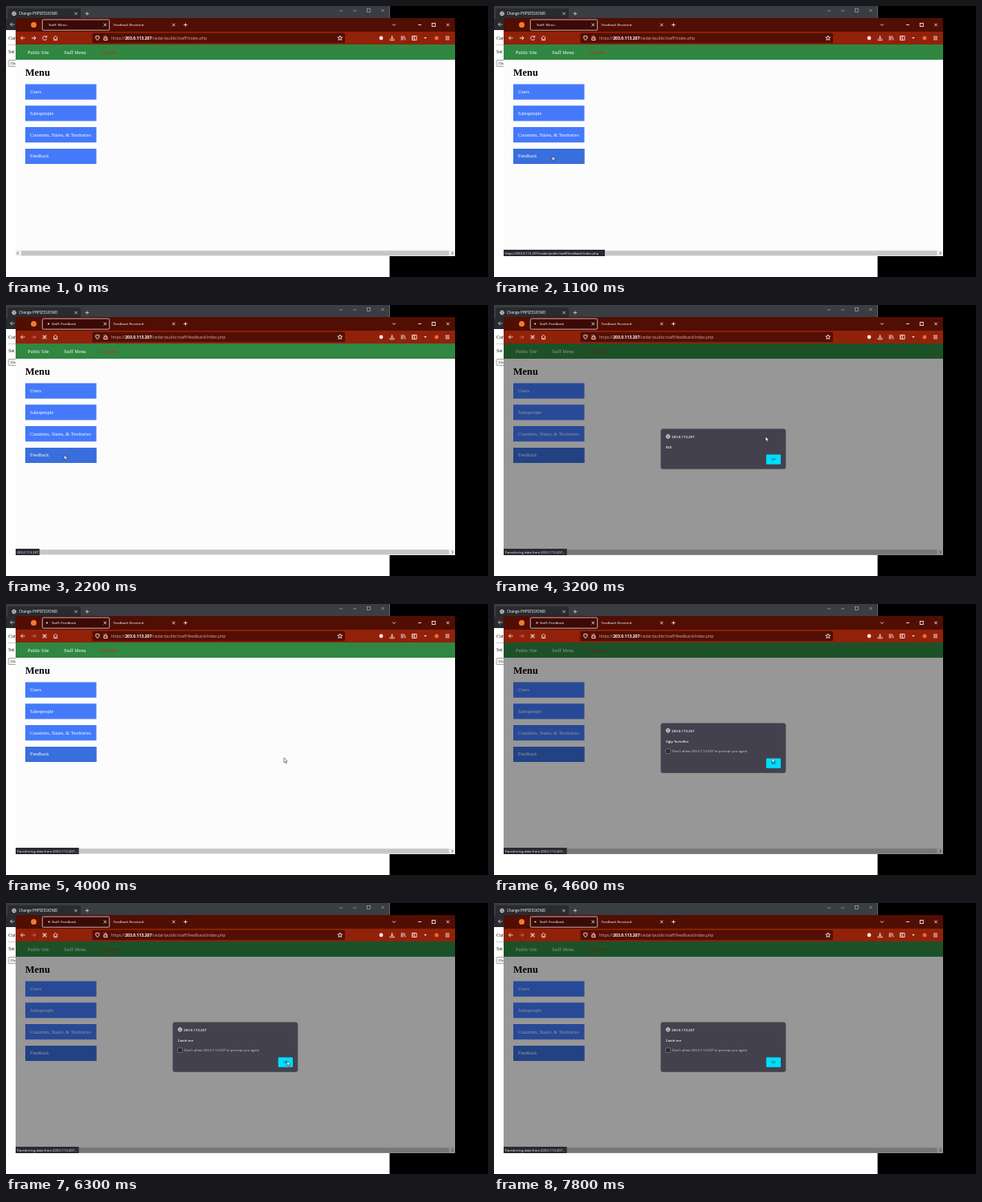
Recreate the animation shown at these times as an HTML page. Size 600 px wide and 338 px high, loop 7.9 s.

```html
<!DOCTYPE html>
<html lang="en">
<head>
<meta charset="utf-8">
<title>Staff feedback</title>
<style>
html, body { margin: 0; width: 100%; height: 100%; overflow: hidden; background: #000; }
svg { display: block; width: 600px; height: 338px; }
text { font: 4.3px "Open Sans", "Noto Sans", sans-serif; fill: #fbfbfe; white-space: pre; }
.serif text { font: 6.1px "Liberation Serif", serif; }
.serif .h1 { font-weight: 700; font-size: 12.3px; fill: #000; }
.url text { font-size: 5.05px; fill: #d9aaa3; }
.url tspan { font-weight: 700; fill: #fff; }
.status rect { fill: #2b2a33; }
.status text { font-size: 4.15px; }
.line { fill: none; stroke: #f6e6e3; stroke-width: .9; }
.thin { stroke-width: .7; }
.gray { stroke: #a5a8ac; }
.bold { font-weight: 600; }
.ok { font-size: 4.1px; fill: #15303a; }

.before, .after, .link, .host, .transfer, .hover, .dim, .xss, .ugly, .catch, .ok1, .ok2, .pointer {
  animation: 7.9s step-end infinite;
}
.before { animation-name: before; }
.after { animation-name: after; }
.link { animation-name: link; }
.host { animation-name: host; }
.transfer { animation-name: transfer; }
.hover { animation-name: hover; }
.dim { animation-name: dim; }
.xss { animation-name: xss; }
.ugly { animation-name: ugly; }
.catch { animation-name: catch; }
.ok1 { animation-name: ok1; }
.ok2 { animation-name: ok2; }
.pointer { animation-name: pointer; }
.move { animation: move 7.9s linear infinite; }
.dot { animation: dot .2079s -.158s ease-in-out infinite alternate; }

@keyframes before { 0% { opacity: 1 } 24.05%, 100% { opacity: 0 } }
@keyframes after { 0% { opacity: 0 } 24.05%, 100% { opacity: 1 } }
@keyframes link { 0%, 24.05%, 100% { opacity: 0 } 11.39% { opacity: 1 } }
@keyframes host { 0%, 29.11%, 100% { opacity: 0 } 24.05% { opacity: 1 } }
@keyframes transfer { 0% { opacity: 0 } 29.11%, 100% { opacity: 1 } }
@keyframes hover { 0% { opacity: 0 } 8.86%, 100% { opacity: 1 } }
@keyframes dim { 0%, 48.73%, 77.85% { opacity: 0 } 30.38%, 52.53%, 79.11%, 100% { opacity: 1 } }
@keyframes xss { 0%, 48.73%, 100% { opacity: 0 } 30.38% { opacity: 1 } }
@keyframes ugly { 0%, 77.85%, 100% { opacity: 0 } 52.53% { opacity: 1 } }
@keyframes catch { 0% { opacity: 0 } 79.11%, 100% { opacity: 1 } }
@keyframes ok1 { 0% { opacity: 0 } 43.04%, 100% { opacity: 1 } }
@keyframes ok2 { 0%, 88.61%, 100% { opacity: 0 } 65.82% { opacity: 1 } }
@keyframes pointer { 0%, 88.61%, 100% { opacity: 0 } 2.53% { opacity: 1 } }
@keyframes move {
  0% { transform: translate(190px, 150px) }
  2.53% { transform: translate(190px, 150px); animation-timing-function: steps(6) }
  10.13% { transform: translate(72.5px, 187px) }
  30.38% { transform: translate(72.5px, 187px); animation-timing-function: steps(8) }
  40.51% { transform: translate(338px, 164px); animation-timing-function: steps(3) }
  44.3% { transform: translate(346px, 191.7px) }
  64.56% { transform: translate(346px, 191.7px); animation-timing-function: steps(8) }
  74.68% { transform: translate(348px, 196px) }
  77.22% { transform: translate(348px, 196px); animation-timing-function: steps(2) }
  79.75% { transform: translate(350px, 197px) }
  83.54% { transform: translate(350px, 197px); animation-timing-function: steps(4) }
  88.61%, 100% { transform: translate(372px, 180px) }
}
@keyframes dot { from { transform: translateX(0) } to { transform: translateX(2.6px) } }
</style>
</head>
<body>
<svg viewBox="0 0 600 338">
  <defs>
    <path id="x" d="M-1.7-1.7 1.7 1.7M1.7-1.7-1.7 1.7"/>
    <path id="plus" d="M-2.2 0H2.2M0-2.2V2.2"/>
    <path id="arrow" d="M2.6 0H-2.6M-.2-2.4-2.6 0-.2 2.4"/>
    <path id="down" d="M-2-1 0 1 2-1"/>
    <path id="min" d="M-2 0H2"/>
    <rect id="max" x="-2" y="-2" width="4" height="4"/>
    <g id="globe" fill="none">
      <circle r="2.4"/><ellipse rx="1.1" ry="2.4"/><path d="M-2.4 0H2.4"/>
    </g>
  </defs>

  <!-- rear window -->
  <path fill="#fff" d="M0 0H477.5V338H0z"/>
  <path fill="#3a3e42" d="M0 0H477.5V16H0z"/>
  <path fill="#282b2f" d="M2 16V5q0-2 2-2H91q2 0 2 2V16zM0 16H477.5V30H0z"/>
  <text x="16" y="11.2" style="font-size:4.5px">Change PHPSESSIONID</text>
  <g class="line thin">
    <use href="#globe" x="10" y="9.5"/>
    <use href="#x" x="87" y="9.5"/>
    <use href="#plus" x="101" y="9.5"/>
    <use href="#arrow" x="8" y="23"/>
    <g class="gray">
      <use href="#down" x="417" y="6"/>
      <use href="#min" x="434" y="6"/>
      <use href="#max" x="451.5" y="5.5"/>
      <use href="#x" x="469" y="5.5"/>
    </g>
  </g>
  <g class="serif">
    <text x="3" y="41.5" style="fill:#222">Current</text>
    <text x="3" y="58.5" style="fill:#222">Set</text>
  </g>
  <path d="M2 48.5H12" stroke="#aaa" stroke-width=".6"/>
  <rect x="3" y="67.5" width="30" height="8" rx="1" fill="#efefef" stroke="#777" stroke-width=".6"/>
  <text x="5.8" y="73.2" style="fill:#222">Change</text>

  <!-- front window -->
  <path fill="#fcfcfc" d="M12 15H559V312H12z"/>
  <path fill="#510e03" d="M12 15H559V32H12z"/>
  <path fill="#92210a" d="M12 32H559V48H12z"/>
  <circle cx="34.5" cy="23.5" r="3.5" fill="#f47a2b"/>
  <rect x="45.3" y="17" width="83.4" height="13.2" rx="1.3" fill="#3c0a06" stroke="#e9d9d6" stroke-width=".8"/>
  <text class="before" x="53" y="25.2">Staff: Menu</text>
  <g class="after">
    <circle class="dot" cx="51" cy="23.5" r=".95" fill="#fff"/>
    <text x="56.7" y="25.2">Staff: Feedback</text>
  </g>
  <text x="133.5" y="25.2">Feedback Received</text>
  <g class="line">
    <use href="#x" x="123.3" y="23.5"/>
    <use href="#x" x="208.7" y="23.5"/>
    <use href="#plus" x="223.4" y="23.5"/>
    <use href="#down" x="483" y="23.5"/>
    <use href="#min" x="515" y="23.5"/>
    <use href="#max" x="532.3" y="23.5"/>
    <use href="#x" x="550" y="23.5"/>
  </g>

  <!-- toolbar -->
  <rect x="107.5" y="33.7" width="314.5" height="12.6" rx="1.5" fill="#530f04"/>
  <g class="line">
    <use href="#arrow" x="21" y="40"/>
    <use href="#arrow" transform="translate(34.5 40) scale(-1 1)" opacity=".4"/>
    <g class="before">
      <use href="#arrow" transform="translate(34.5 40) scale(-1 1)"/>
      <path d="M50.2 38.6A2.5 2.5 0 1 0 50.5 40.8M50.6 37V39H48.6"/>
    </g>
    <use class="after" href="#x" transform="translate(48 40) scale(1.35)"/>
    <path d="M58.9 40 61.6 37.3 64.3 40M59.7 39.6V42.6H63.5V39.6M61.6 42.6V40.8"/>
    <path d="M113.9 37.2 116.2 38Q116.2 41.4 113.9 42.8 111.6 41.4 111.6 38z"/>
    <path d="M121.8 39.8H126V42.5H121.8zM122.6 39.8V38.4Q123.9 36.4 125.2 38.4V39.8"/>
    <path d="M121.3 37.3 126.7 42.7" stroke="#ff5a4a"/>
    <path d="M415.7 37 416.5 39 418.6 39.1 417 40.5 417.5 42.6 415.7 41.4 413.9 42.6 414.4 40.5 412.8 39.1 414.9 39z"/>
    <path d="M480.6 37V41M478.9 39.5 480.6 41.2 482.3 39.5M478 41.2V42.7H483.2V41.2"/>
    <path d="M492.3 37.3V42.7M494.1 37.3V42.7M495.6 37.6 497.2 42.6"/>
    <path d="M505.5 37.5H511.1V42.5H505.5zM508.3 37.5V42.5M506.5 39H507.5M506.5 40.5H507.5"/>
    <path d="M547 38.1H552M547 40H552M547 41.9H552"/>
  </g>
  <circle cx="467" cy="40" r="2.4" fill="#f6e6e3"/>
  <path fill="#f6e6e3" d="M520.3 39H523.7L522 41z"/>
  <circle cx="536" cy="40" r="2.5" fill="#e8683f"/>
  <g class="url">
    <text class="before" x="131" y="41.8">https://<tspan>203.0.113.207</tspan>/cedar/public/staff/index.php</text>
    <text class="after" x="131" y="41.8">https://<tspan>203.0.113.207</tspan>/cedar/public/staff/feedback/index.php</text>
  </g>

  <!-- page -->
  <path fill="#2f8742" d="M12 48H559V67H12z"/>
  <g fill="#447afa">
    <path d="M24 97.5H112.5V116.7H24zM24 124.3H112.5V143.5H24zM24 151.1H112.5V170.3H24zM24 177.9H112.5V197.1H24z"/>
    <path class="hover" fill="#396edd" d="M24 177.9H112.5V197.1H24z"/>
  </g>
  <g class="serif">
    <text x="27" y="60">Public Site</text>
    <text x="72" y="60">Staff Menu</text>
    <text x="118" y="60" style="fill:#d81e1e">Log Out</text>
    <text class="h1" x="24" y="86.6">Menu</text>
    <text x="30" y="109">Users</text>
    <text x="30" y="135.8">Salespeople</text>
    <text x="30" y="162.6">Countries, States, &amp; Territories</text>
    <text x="30" y="189.4">Feedback</text>
  </g>
  <path fill="#f0f0f0" d="M12 304.5H559V312H12z"/>
  <path fill="#c6c6c6" d="M19 305.3H551.5V311.3H19z"/>
  <path d="M15.4 306.6 13.8 308.3 15.4 310M554.9 306.6 556.5 308.3 554.9 310" fill="none" stroke="#444" stroke-width=".9"/>
  <path class="dim" fill="#000" fill-opacity=".4" d="M12 48H559V312H12z"/>

  <g class="status">
    <g class="link">
      <rect x="12" y="304" width="126" height="8"/>
      <text x="13.6" y="309.7">https://203.0.113.207/cedar/public/staff/feedback/index.php</text>
    </g>
    <g class="host">
      <rect x="12" y="304" width="29.7" height="8"/>
      <text x="13.4" y="309.7">203.0.113.207</text>
    </g>
    <g class="transfer">
      <rect x="12" y="304" width="78.7" height="8"/>
      <text x="13.4" y="309.7">Transferring data from 203.0.113.207...</text>
    </g>
  </g>

  <!-- dialogs -->
  <g class="xss">
    <rect x="207.7" y="154.6" width="155.4" height="50" rx="2.6" fill="#42414d" stroke="#56555f" stroke-width=".5"/>
    <use class="line thin" href="#globe" x="216.7" y="164"/>
    <text class="bold" x="221.3" y="165.6">203.0.113.207</text>
    <text class="bold" x="213.7" y="179">XSS</text>
    <rect x="338.8" y="186.6" width="18.2" height="12.2" rx="1.3" fill="#00ddff"/>
    <rect class="ok1" x="338.8" y="186.6" width="18.2" height="12.2" rx="1.3" fill="#80ebff"/>
    <text class="ok" x="348" y="194.2" text-anchor="middle">OK</text>
  </g>
  <g class="dim">
    <g class="ugly"><use href="#prompt"/><text class="bold" x="213.7" y="172.7">Ugly Tortellini</text></g>
    <g class="catch"><use href="#prompt"/><text class="bold" x="213.7" y="172.7">Catch me</text></g>
  </g>
  <defs>
    <g id="prompt">
      <rect x="207.7" y="148.7" width="155.4" height="62" rx="2.6" fill="#42414d" stroke="#56555f" stroke-width=".5"/>
      <use class="line thin" href="#globe" x="216.7" y="157.8"/>
      <text class="bold" x="221.3" y="159.5">203.0.113.207</text>
      <rect x="213.8" y="180.7" width="5.8" height="5.8" rx=".7" fill="#2b2a33" stroke="#8f8f9d" stroke-width=".6"/>
      <text x="222" y="185.3" style="fill:#d0d0d6">Don't allow 203.0.113.207 to prompt you again</text>
      <rect x="338.8" y="192.6" width="18.2" height="12.2" rx="1.3" fill="#00ddff"/>
      <rect class="ok2" x="338.8" y="192.6" width="18.2" height="12.2" rx="1.3" fill="#80ebff"/>
      <text class="ok" x="348" y="200.2" text-anchor="middle">OK</text>
    </g>
  </defs>

  <g class="move">
    <path class="pointer" d="M0 0V6L1.4 4.8 2.4 7 3.4 6.5 2.4 4.4H4.2z" fill="#fff" stroke="#111" stroke-width=".5"/>
  </g>
</svg>
</body>
</html>
```
